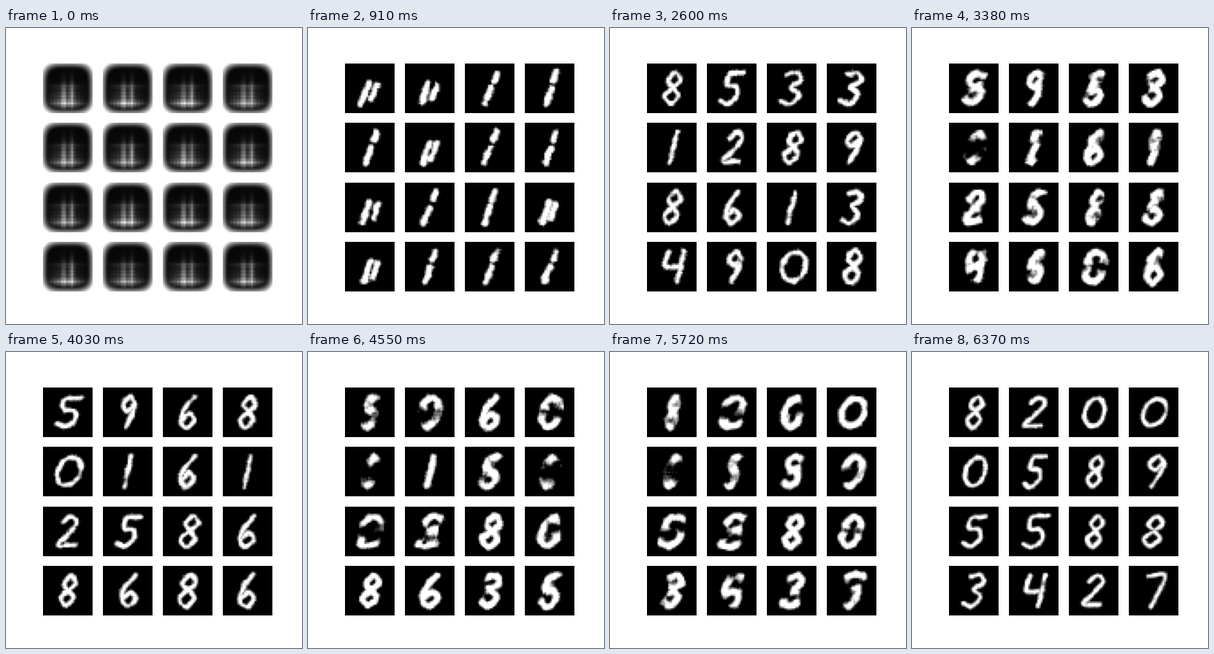
Write a matplotlib script that moves like this. It is 400 px wide and 400 px high and loops after 6.5 s.

```python
import numpy as np
import matplotlib.pyplot as plt
from matplotlib.animation import FuncAnimation

FRAMES, INTERVAL = 50, 130
CELLS, SIDE = 28, 67
axis = (np.arange(CELLS) + 0.5) * SIDE / CELLS
GX, GY = np.meshgrid(axis, axis)

# Pen strokes inside a box from -1 to 1
GLYPHS = {
    "1": [[0, -1, 0, 1]],
    "2": [[-.7, -.6, 0, -1, .7, -.6, 0, .2, -.8, .9, .9, .9]],
    "3": [[-.7, -.9, .2, -1, .7, -.5, -.1, -.1, .7, .4, .1, 1, -.8, .8]],
    "4": [[-.7, -1, -.8, 0, .7, 0], [.7, -1, .5, 1]],
    "5": [[.8, -1, -.5, -.9, -.5, -.2, .4, -.1, .7, .5, 0, 1, -.8, .8]],
    "6": [[.3, -1, -.5, -.2, -.6, .6, .1, 1, .7, .5, .1, .1, -.5, .5]],
    "7": [[-.8, -.9, .8, -.9, -.1, 1]],
    "8": [[0, -.05, -.6, -.5, 0, -1, .6, -.5, 0, -.05, -.65, .5, 0, 1, .65, .5, 0, -.05]],
    "9": [[.6, -.6, 0, -1, -.6, -.5, 0, -.1, .6, -.6, .4, .3, 0, 1]],
    '"': [[-.3, -.3, -.3, 1], [.5, -.2, .5, .7]],
    ":": [[0, -1, 0, -.5], [0, 0, 0, 1]],
    ",": [[0, -.6, 0, .1]],
}

# What the sixteen tiles show at each milestone; they drift in between
SCENES = {
    7: '""::' ':"::' '"::"' '":::',
    12: "38,9" "8638" "8902" "8880",
    20: "8533" "1289" "8613" "4908",
    31: "5968" "0161" "2586" "8686",
    39: "1060" "1150" "0280" "8635",
    49: "8200" "0589" "5588" "3427",
}
KEYS = list(SCENES)
START = KEYS[0]


def spline(flat, steps=16):
    """Catmull-Rom curve through the points."""
    p = np.array(flat, float).reshape(-1, 2)
    p = np.vstack([2 * p[0] - p[1], p, 2 * p[-1] - p[-2]])
    t = np.linspace(0, 1, steps)[:, None]
    return np.vstack([
        0.5 * (2 * b + (d - a) * t + (2 * a - 5 * b + 4 * d - e) * t**2
               + (3 * b - a - 3 * d + e) * t**3)
        for a, b, d, e in zip(p, p[1:], p[2:], p[3:])])


def outline(char):
    if char == "0":
        a = np.linspace(0, 2 * np.pi, 70)
        return np.column_stack([np.cos(a), 0.9 * np.sin(a)])
    return np.vstack([spline(stroke) for stroke in GLYPHS[char]])


def distance(key, tile):
    """Distance of every cell from the pen path, in a seeded hand."""
    rng = np.random.default_rng([key, tile])
    gx, gy = outline(SCENES[key][tile]).T
    rx, ry = 14 * rng.uniform(0.85, 1.15), 21 * rng.uniform(0.92, 1.04)
    lean = np.interp(key, [7, 20, 49], [0.36, 0.2, 0.2]) + rng.uniform(-0.06, 0.06)
    x = 35 + rng.uniform(-1.5, 1.5) + rx * gx - lean * ry * gy
    y = 33.5 + ry * gy
    return np.hypot(GX[..., None] - x, GY[..., None] - y).min(-1)


DIST = {key: [distance(key, tile) for tile in range(16)] for key in KEYS}


def grain(rng, size=1):
    n = rng.normal(size=(CELLS, CELLS))
    shifts = range(size)
    return sum(np.roll(n, (i, j), (0, 1)) for i in shifts for j in shifts) / size


def drawing(frame, tile):
    """Strokes of two milestones melted into each other, with ragged edges."""
    rng = np.random.default_rng([frame, tile, 1])
    t, pair = 0.0, (START, START)
    for a, b in zip(KEYS, KEYS[1:]):
        if a <= frame <= b:
            t, pair = (frame - a) / (b - a), (a, b)
    t = t * t * (3 - 2 * t)
    d = (1 - t) * DIST[pair[0]][tile] + t * DIST[pair[1]][tile]
    half = np.interp(frame, [7, 12, 20, 49], [4.2, 4.0, 3.2, 2.9])
    half += 6 * t * (1 - t)
    rough = np.interp(frame, [7, 12, 20, 49], [0.8, 1.7, 0.7, 0.5])
    soft = 3 + 2 * max(0, START - frame)
    return np.clip((half + rough * grain(rng, 3) - d) / soft + 0.5, 0, 1)


def bump(x, y, sx, sy):
    return np.exp(-((GX - x) / sx)**2 - ((GY - y) / sy)**2)


def haze(tile):
    """Untrained output: dark cushion with faint streaks on a woven grid."""
    rng = np.random.default_rng(100 + tile)
    g = rng.uniform(0.75, 1.2, 5)
    glow = (0.32 * g[0] * bump(28, 44, 3, 18) + 0.36 * g[1] * bump(39, 42, 3, 18)
            + 0.42 * g[2] * bump(32, 54, 20, 4) + 0.14 * g[3] * bump(32, 31, 20, 3)
            + 0.2 * g[4] * bump(30, 48, 20, 14))
    wave = (-1.0)**np.arange(CELLS)
    weave = 1 + 0.1 * wave + 0.1 * wave[:, None]
    x, y = np.abs(GX / 33.5 - 1), np.abs(GY / 33.5 - 1)
    r = (x**4 + y**4)**0.25
    edge = np.clip((r - 0.76) / 0.32, 0, 1)**1.5
    return 0.03 + glow * weave, edge


def tile_image(frame, tile):
    if frame >= START:
        return drawing(frame, tile)
    t = frame / START
    glow, edge = haze(tile)
    img = glow * (1 - t) + t * drawing(frame, tile)
    return np.clip(np.maximum(img, edge * (1 - t)**2), 0, 1)


fig, axes = plt.subplots(4, 4, figsize=(4, 4), dpi=100)
images = []
for ax in axes.flat:
    ax.axis("off")
    images.append(ax.imshow(np.zeros((CELLS, CELLS)), cmap="gray", vmin=0, vmax=1))


def update(frame):
    for tile, im in enumerate(images):
        im.set_data(tile_image(frame, tile))
    return images


anim = FuncAnimation(fig, update, frames=FRAMES, interval=INTERVAL, repeat=True, repeat_delay=0)
plt.show()
```
